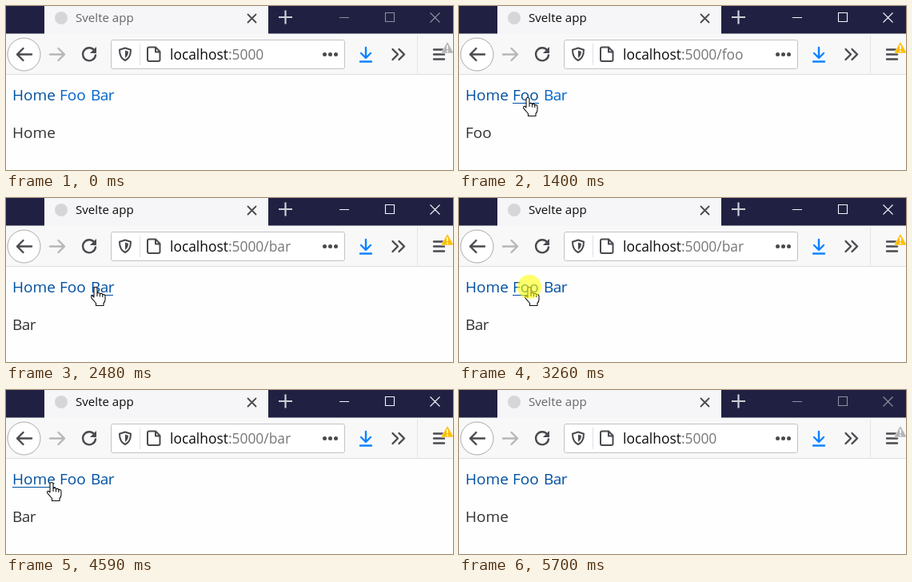
Write an HTML page that moves like this. It is 559 px wide and 205 px high and loops after 5.86 s.

```html
<!DOCTYPE html>
<html lang="en">
<head>
<meta charset="utf-8">
<title>Svelte app</title>
<style>
  html, body { margin: 0; width: 100%; height: 100%; overflow: hidden; background: #fff; }
  svg { display: block; width: 559px; height: 205px; }
  text { font-family: "Open Sans", "Noto Sans", sans-serif; white-space: pre; }
  .icon { fill: none; stroke: #4a4a4f; stroke-width: 2.4; stroke-linecap: round; stroke-linejoin: round; }
  .page { font-size: 19px; fill: #333; }
  .link { fill: rgb(0, 100, 200); }
  .link line { stroke: rgb(0, 80, 160); display: none; }
  .link.visited { fill: rgb(0, 80, 160); }
  .link.hover line { display: inline; }
  .tight { letter-spacing: -.6px; }
  #title { font-size: 15.1px; fill: #66666b; }
  #buttons { fill: none; stroke: #8f8f9f; stroke-width: 1.1; }
  #alert { fill: #b5b5b7; }
  .active #title { fill: #0c0c0d; }
  .active #buttons { stroke: #f4f4f8; }
  .active #alert { fill: #ffbf00; }
  #cursor path { fill: #fff; stroke: #111; stroke-width: 1.1; stroke-linejoin: round; }
</style>
</head>
<body>
<svg id="stage" viewBox="0 0 559 205">
  <rect width="559" height="205" fill="#fefefe"/>
  <rect width="559" height="35" fill="#202142"/>
  <rect x="48" width="280" height="35" fill="#f6f6f8"/>
  <rect y="34.5" width="559" height="51" fill="#f8f8f9"/>
  <path d="M0 85.5H559" stroke="#dedee0"/>

  <!-- tab strip -->
  <circle cx="69" cy="15" r="8" fill="#d6d6d8"/>
  <text id="title" x="87" y="20">Svelte app</text>
  <path class="icon" style="stroke-width:1.8" d="M302.5 10.5l10 10m0-10l-10 10"/>
  <path d="M341 14h17M349.500 5.500v17" stroke="#cfcfd8" stroke-width="2.2"/>
  <path id="buttons" d="M417 14.500h12M474.500 8.500h11v11h-11zM530.500 8.500l12 12m0-12l-12 12"/>

  <!-- toolbar -->
  <circle cx="22.500" cy="60.500" r="20.500" fill="#fff" stroke="#a9a9ab"/>
  <path class="icon" d="M32 60.500H14M21.500 53l-7.500 7.500 7.500 7.500"/>
  <path class="icon" style="stroke:#b7b7ba" d="M55 60.500H73M65.500 53l7.500 7.500-7.500 7.500"/>
  <path class="icon" d="M110.500 55.500a8 8 0 1 0 1.500 6"/>
  <path d="M113 51v8h-8z" fill="#4a4a4f"/>
  <rect x="131.500" y="42.500" width="292" height="36" rx="2.500" fill="#fff" stroke="#c3c3c6"/>
  <path class="icon" style="stroke-width:2" d="M149 52.500l7 2.300q0 10-7 13.200-7-3.200-7-13.200z"/>
  <path d="M149 55.500l4 1.500q-.3 5.500-4 8z" fill="#4a4a4f"/>
  <path d="M167.500 47V74" stroke="#e1e1e4"/>
  <path class="icon" style="stroke-width:2" d="M179 51.500h8l5.500 5.500v10q0 2-2 2H179q-2 0-2-2V53.500q0-2 2-2zM187 52v5.500h5.500"/>
  <text x="205" y="67" font-size="17.4" fill="#0c0c0d">localhost<tspan fill="#77777a">:5000<tspan id="path"></tspan></tspan></text>
  <g fill="#4a4a4f">
    <circle cx="398.500" cy="60.500" r="2.500"/><circle cx="405.500" cy="60.500" r="2.500"/><circle cx="412.500" cy="60.500" r="2.500"/>
  </g>
  <path class="icon" style="stroke:#0a84ff" d="M450 52v12M444 59l6 6 6-6M443 69.500h14"/>
  <path class="icon" d="M483.500 54l6.500 6.500-6.500 6.500M491.500 54l6.500 6.500-6.500 6.500"/>
  <path d="M514.500 37V84" stroke="#e4e4e6"/>
  <path class="icon" d="M535 54.500h13M535 60.500h13M535 66.500h13"/>
  <path id="alert" d="M552 44.500L560 59H544z" stroke="#f8f8f9" stroke-width=".6"/>
  <path d="M552 49v5M552 55.500v2" stroke="#fff" stroke-width="1.800"/>

  <!-- page -->
  <g class="page">
    <g class="link" id="home"><text x="8" y="118">Home</text><line x1="8" x2="62" y1="121.500" y2="121.500"/></g>
    <g class="link" id="foo"><text x="67" y="118">Foo</text><line x1="67" x2="100" y1="121.500" y2="121.500"/></g>
    <g class="link" id="bar"><text class="tight" x="106" y="118">Bar</text><line x1="106" x2="134" y1="121.500" y2="121.500"/></g>
    <text id="content" x="8" y="165">Home</text>
  </g>

  <g id="cursor">
    <path id="arrow" d="M0 0V17L4 13.500 6.500 19.500 9 18.500 6.500 12.500H12Z"/>
    <path id="hand" d="M-2 2Q-2 .5 0 .5 2 .5 2 2.500V8Q4.800 6.500 5.500 8.800 8 7.500 8.800 9.800 11.500 9 12 11.500V16Q12 18.500 10 20.500V23.500H.5V20.500L-5.200 13.800Q-6 11 -3.800 11.300L-2 13ZM2 8v4M5.500 8.800V12.500M8.800 9.800V13"/>
  </g>
  <circle id="press" r="15" fill="#ff0" fill-opacity=".58"/>
</svg>
<script>
  const LOOP = 5860, URL_LAG = 70;
  const el = id => document.getElementById(id);

  // mouse down, mouse up, link
  const clicks = [
    [1150, 1320, 'foo'], [2250, 2400, 'bar'], [3260, 3430, 'foo'],
    [3980, 4210, 'bar'], [4980, 5060, 'home']
  ];

  // first step, last step, number of steps, from, to, easing
  const easeOut = p => 1 - (1 - p) ** 2;
  const easeIn = p => p ** 1.4;
  const linear = p => p;
  const moves = [
    [210, 770, 8, [302, 183], [90, 115], easeOut],
    [850, 1000, 3, [90, 115], [86, 114], linear],
    [1780, 2100, 5, [86, 114], [112, 111], easeOut],
    [2710, 3110, 6, [112, 111], [88, 111], easeOut],
    [3510, 3980, 7, [88, 111], [121, 112], easeOut],
    [4440, 4590, 3, [121, 112], [57, 115], linear],
    [4670, 4980, 5, [57, 115], [38, 112], easeOut],
    [5140, 5290, 3, [38, 112], [437, 178], easeIn]
  ];
  const links = { home: [8, 62], foo: [67, 100], bar: [106, 134] };

  function cursorAt(t) {
    if (t < 210 || t >= 5370) return null;
    const [t0, t1, n, from, to, ease] = moves.filter(m => t >= m[0]).pop();
    const step = Math.min(n - 1, Math.floor((t - t0) / (t1 - t0) * (n - 1) + .05));
    // The first move starts where the pointer enters; later ones leave at once.
    const p = ease(t0 === 210 ? step / (n - 1) : (step + 1) / n);
    return from.map((a, i) => Math.round(a + (to[i] - a) * p));
  }

  const routeAt = t => clicks.reduce((route, c) => t >= c[1] ? c[2] : route, 'home');
  const show = (id, on) => el(id).style.display = on ? 'inline' : 'none';

  function draw(t) {
    const pos = cursorAt(t);
    const over = pos && pos[1] > 97 && pos[1] < 126 &&
      Object.keys(links).find(k => pos[0] >= links[k][0] && pos[0] <= links[k][1]);

    el('stage').classList.toggle('active', t >= 1150 && t < 5700);
    const page = routeAt(t), url = routeAt(t - URL_LAG);
    el('content').textContent = page[0].toUpperCase() + page.slice(1);
    el('content').classList.toggle('tight', page === 'bar');
    el('path').textContent = url === 'home' ? '' : '/' + url;

    for (const k in links) {
      const seen = k === 'home' || clicks.some(c => c[2] === k && t >= c[1] + URL_LAG);
      el(k).classList.toggle('visited', seen);
      el(k).classList.toggle('hover', k === over);
    }

    show('cursor', pos);
    show('hand', over);
    show('arrow', !over);
    show('press', pos && clicks.some(c => t >= c[0] && t < c[1]));
    if (pos) {
      el('cursor').setAttribute('transform', `translate(${pos})`);
      el('press').setAttribute('transform', `translate(${pos})`);
    }
  }

  function tick() {
    draw(performance.now() % LOOP);
    requestAnimationFrame(tick);
  }
  tick();
</script>
</body>
</html>
```
